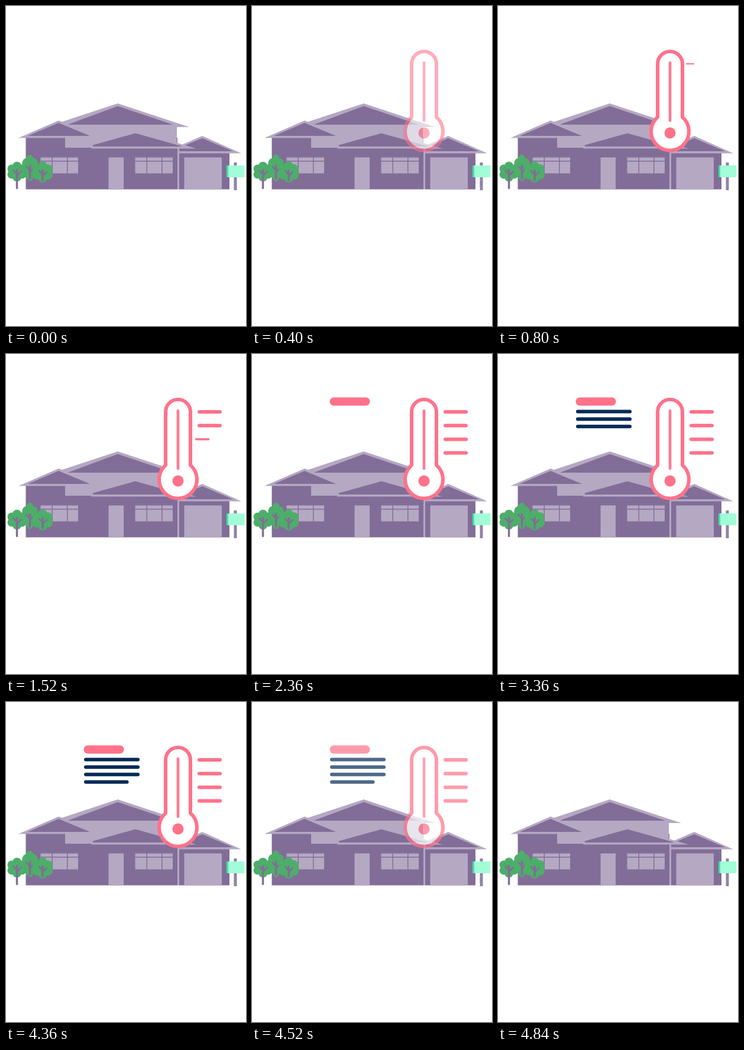
An HTML page with a canvas for the animation above (6 s loop, 406 by 542 pixels).

```html
<!DOCTYPE html>
<html lang="en">
<head>
<meta charset="utf-8">
<title>House temperature</title>
<style>
  html, body { margin: 0; width: 100%; height: 100%; overflow: hidden; background: #fff; }
  canvas { position: absolute; left: 0; top: 0; width: 406px; height: 542px; }
</style>
</head>
<body>
<canvas id="scene"></canvas>
<canvas id="overlay"></canvas>
<script>
const W = 406, H = 542, LOOP = 6000, STEP = 1000 / 3;
const DARK = '#826d98', LIGHT = '#b5a8c3', GREEN = '#4dae69';
const PINK = '#ff728a', NAVY = '#042a57';

function context(id) {
  const canvas = document.getElementById(id);
  const ratio = window.devicePixelRatio || 1;
  canvas.width = W * ratio;
  canvas.height = H * ratio;
  const c = canvas.getContext('2d');
  c.scale(ratio, ratio);
  return c;
}

const scene = context('scene');
const over = context('overlay');
const layer = document.getElementById('overlay');

function rect(color, x, y, w, h) {
  scene.fillStyle = color;
  scene.fillRect(x, y, w, h);
}

function poly(color, ...p) {
  scene.fillStyle = color;
  scene.beginPath();
  for (let i = 0; i < p.length; i += 2) scene.lineTo(p[i], p[i + 1]);
  scene.fill();
}

function disc(c, color, x, y, r) {
  c.fillStyle = color;
  c.beginPath();
  c.arc(x, y, r, 0, Math.PI * 2);
  c.fill();
}

function line(c, color, width, x1, y1, x2, y2) {
  c.strokeStyle = color;
  c.lineWidth = width;
  c.lineCap = 'round';
  c.beginPath();
  c.moveTo(x1, y1);
  c.lineTo(x2, y2);
  c.stroke();
}

function panes(x) {
  rect(LIGHT, x, 256.5, 63.5, 27);
  rect(DARK, x, 262, 63.5, 1.5);
  for (const dx of [19, 44.5]) rect(DARK, x + dx, 256.5, 1.5, 27);
}

function drawHouse() {
  // Walls
  rect(DARK, 33.5, 223, 256.5, 87.5);
  rect(DARK, 293, 247, 85, 63.5);
  rect(LIGHT, 290, 241, 3, 69.5);

  // Upper storey
  rect(LIGHT, 100, 200, 189, 40);
  poly(LIGHT, 189, 165, 310, 205, 80, 205, 80, 201);
  poly(DARK, 189, 169.5, 283, 201, 104, 201);

  // Left roof
  poly(LIGHT, 89, 194, 148, 217, 148, 223.5, 21, 223.5);
  poly(DARK, 89, 198, 142, 220, 37, 220);

  // Garage roof
  poly(LIGHT, 332, 220, 398, 249.5, 293, 249.5, 293, 237);
  poly(DARK, 332, 224, 384, 246, 293, 246, 293, 240);

  // Porch roof
  poly(LIGHT, 144, 217, 219, 211, 322, 241.5, 144, 241.5);
  poly(DARK, 219, 215.5, 299, 238, 147, 238, 147, 235.5);

  panes(58.5);
  panes(218.5);
  rect(LIGHT, 173.5, 256.5, 25.5, 54);
  rect(LIGHT, 301.5, 256.5, 63.5, 54);
}

// Crown of six lobes around a core, with a forked trunk
function tree(x, y, rx, ry, base) {
  scene.save();
  scene.translate(x, y);
  scene.scale(rx, ry);
  disc(scene, GREEN, 0, 0, 0.72);
  for (let i = 0; i < 6; i++) {
    const a = (i + 0.5) * Math.PI / 3;
    disc(scene, GREEN, 0.58 * Math.cos(a), 0.58 * Math.sin(a), 0.44);
  }
  scene.restore();
  line(scene, DARK, 3.5, x, y - 3, x, base);
  line(scene, DARK, 2.5, x, y + 7, x + 7, y);
  line(scene, DARK, 2.5, x, y + 4, x - 6, y - 2);
}

function drawYard() {
  tree(18.5, 280.5, 17, 16.5, 308.5);
  tree(40.5, 274, 14, 22, 293);
  tree(62, 281, 18, 17.5, 295);
  rect('#9182a5', 385.5, 265, 5, 47);
  rect('#a1fdd7', 375, 270, 28.5, 20);
  rect('#3fe39f', 373, 270, 3, 20);
}

function drawThermometer() {
  const neck = Math.asin(21 / 32);
  over.beginPath();
  over.arc(291, 98, 21, Math.PI, 0);
  over.arc(291, 212.5, 32, -Math.PI / 2 + neck, Math.PI * 1.5 - neck);
  over.closePath();
  over.fillStyle = '#fff';
  over.fill();
  over.strokeStyle = PINK;
  over.lineWidth = 6;
  over.lineJoin = 'round';
  over.stroke();
  line(over, '#ffa0b0', 5, 291, 96, 291, 194);
  line(over, PINK, 3, 291, 96, 291, 194);
  disc(over, PINK, 291, 215, 9.5);
}

function ease(u) {
  u = Math.min(1, Math.max(0, u));
  return u * u * (3 - 2 * u);
}

// A rounded bar that grows out of a point to its left
function bar(s, color, origin, left, right, y, thick) {
  if (!s) return;
  const w = thick * s;
  line(over, color, w,
    origin + (left - origin) * s + w / 2, y,
    origin + (right - origin) * s - w / 2, y);
}

// Bars follow one another: four marks, a heading, four lines of text
function drawBars(t) {
  const grown = i => ease(t / STEP - 2 - i);
  for (let i = 0; i < 4; i++) {
    bar(grown(i), PINK, 314, 324, 365, 98 + 23.2 * i, 6);
    bar(grown(i + 5), NAVY, 113, 132, i < 3 ? 226 : 207.5, 97.6 + 12.6 * i, 6);
  }
  bar(grown(4), PINK, 88, 131.5, 199.5, 80.5, 14);
}

function frame(t) {
  over.clearRect(0, 0, W, H);
  drawThermometer();
  drawBars(t);
  layer.style.opacity = ease((t - 67) / 600) * (1 - ease((t - 4340) / 500));
}

drawHouse();
drawYard();
const begin = performance.now();
function tick() {
  frame((performance.now() - begin) % LOOP);
  requestAnimationFrame(tick);
}
tick();
</script>
</body>
</html>
```
